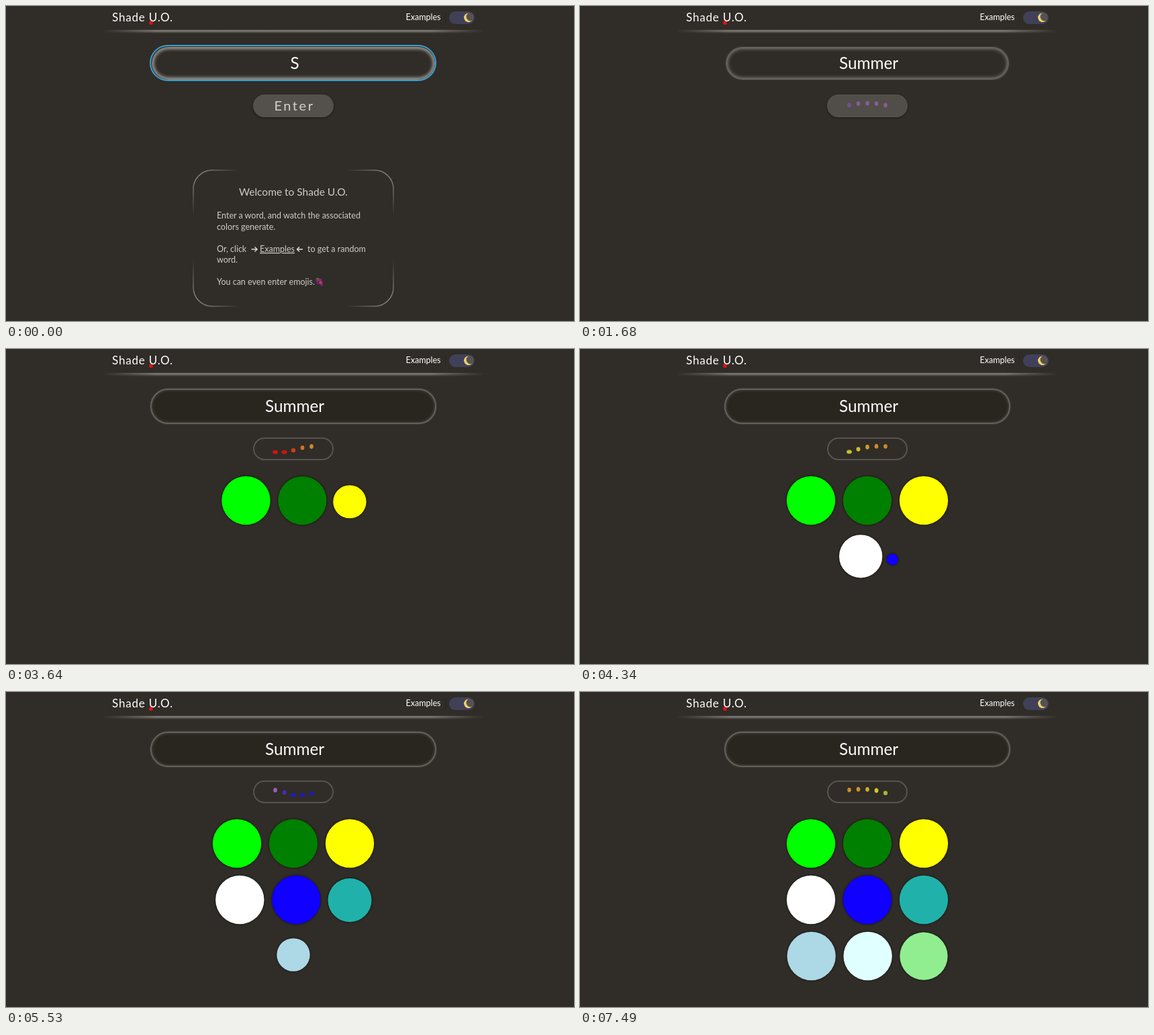
Animation of 846 by 470 pixels, one loop 7.56 s. Source, as an HTML page:

```html
<!DOCTYPE html>
<html lang="en">
<head>
<meta charset="utf-8">
<title>Color words</title>
<style>
html, body { margin: 0; width: 100%; height: 100%; overflow: hidden; background: #302c27; }
body { position: relative; }
div, svg { position: absolute; box-sizing: border-box; }
svg { left: 0; top: 0; }
text { font-family: Lato, "Open Sans", sans-serif; fill: #fff; }
.mid { text-anchor: middle; }
.soft { fill: #cfccc7; font-size: 12.5px; }
.rule { left: 143px; top: 35px; width: 570px; height: 6px;
  background: linear-gradient(#0000, #89857f 30%, #69655f 50%, #0000);
  -webkit-mask: linear-gradient(90deg, #0000, #000 14%, #000 86%, #0000);
  mask: linear-gradient(90deg, #0000, #000 14%, #000 86%, #0000); }
.toggle { left: 660px; top: 8px; width: 38px; height: 19px; border-radius: 10px; background: #404158; }
.field { border-radius: 27px; }
#ring { left: 214px; top: 58px; width: 427px; height: 54px; border: 2px solid #35a0d2; }
#idle { left: 217px; top: 61px; width: 422px; height: 49px; border: 1px solid #85817b;
  box-shadow: inset 0 0 5px 2px #aaa69f; }
#busy { left: 215px; top: 59px; width: 426px; height: 53px; border: 2px solid #64605a; background: #29251f;
  box-shadow: inset 0 0 4px #56524c, 0 0 3px #4b4741; }
#fill, #edge { left: 368px; top: 132px; width: 120px; height: 34px; border-radius: 17px; }
#fill { background: #54514c; box-shadow: 0 1px 3px #1c1916; }
#edge { border: 2px solid #57534e; }
#balls circle { filter: drop-shadow(0 0 1.5px #0d0b08); }
</style>
</head>
<body>
<div class="rule"></div>
<div class="toggle"></div>
<div id="busy" class="field"></div>
<div id="idle" class="field"></div>
<div id="ring" class="field"></div>
<div id="fill"></div>
<div id="edge"></div>
<svg width="846" height="470" viewBox="0 0 846 470">
  <defs>
    <radialGradient id="fade" gradientUnits="userSpaceOnUse" cx="284" cy="250" r="64">
      <stop offset="0" stop-color="#8a867f"/>
      <stop offset=".35" stop-color="#726e68"/>
      <stop offset="1" stop-color="#726e68" stop-opacity="0"/>
    </radialGradient>
    <path id="corner" d="M279 314V273A28 28 0 0 1 307 245H348" fill="none" stroke="url(#fade)" stroke-width="1.5"/>
    <path id="arrow" d="M0 0H8.5M5 -3.5L8.5 0L5 3.5" fill="none" stroke="#e2dfda" stroke-width="1.4"/>
    <clipPath id="disc"><circle cx="689" cy="17.300" r="7"/></clipPath>
  </defs>

  <circle cx="216" cy="25" r="3" fill="#d8141c"/>
  <text x="158" y="23" font-size="17" letter-spacing=".8">Shade U.O.</text>
  <text x="595.500" y="21" font-size="12.500">Examples</text>
  <path d="M654.500 9V25" stroke="#28241f"/>
  <g clip-path="url(#disc)">
    <circle cx="689" cy="17.300" r="7" fill="#f2cf70"/>
    <circle cx="692" cy="16" r="6.500" fill="#55524f"/>
  </g>

  <text id="word" class="mid" x="430" y="93.500" font-size="24.300"></text>
  <text id="enter" class="mid" x="429.500" y="156" font-size="20" letter-spacing="2.600" style="fill:#d3d0cb">Enter</text>

  <g id="welcome">
    <use href="#corner"/>
    <use href="#corner" transform="matrix(-1 0 0 1 856 0)"/>
    <use href="#corner" transform="matrix(1 0 0 -1 0 693)"/>
    <use href="#corner" transform="matrix(-1 0 0 -1 856 693)"/>
    <text class="soft mid" x="428" y="283" style="font-size:15.500px">Welcome to Shade U.O.</text>
    <text class="soft" x="314" y="317">Enter a word, and watch the associated</text>
    <text class="soft" x="314" y="333.500">colors generate.</text>
    <text class="soft" x="314" y="367">Or, click</text>
    <use href="#arrow" x="365.500" y="363"/>
    <text class="soft" x="378" y="367" text-decoration="underline">Examples</text>
    <use href="#arrow" transform="translate(442 363) scale(-1 1)"/>
    <text class="soft" x="449" y="367">to get a random</text>
    <text class="soft" x="314" y="383">word.</text>
    <text class="soft" x="314" y="416">You can even enter emojis.</text>
    <g fill="#8d2a70">
      <circle cx="464" cy="409.500" r="2.500"/><circle cx="468" cy="409" r="2.500"/>
      <circle cx="465" cy="413" r="2.500" fill="#6f2060"/><circle cx="469" cy="413" r="2.500" fill="#a03a84"/>
      <circle cx="470.500" cy="416" r="2" fill="#7b2465"/>
    </g>
    <path d="M461 407Q464 404 467 407Q464 409 461 407" fill="#4c7a35"/>
  </g>

  <g id="dots"></g>
  <g id="balls"></g>
</svg>
<script>
const LOOP = 7560, STEP = 70, SUBMIT = 1330, LOADING = 1540;
const $ = id => document.getElementById(id);
const clamp = v => Math.max(0, Math.min(1, v));

function add(parent, tag) {
  const el = document.createElementNS('http://www.w3.org/2000/svg', tag);
  return $(parent).appendChild(el);
}
function set(el, attrs) {
  for (const key in attrs) el.setAttribute(key, attrs[key]);
}

// fill and the moment each ball starts to grow
const balls = [
  ['#00ff00', 2165], ['#008000', 2700], ['#ffff00', 3240],
  ['#ffffff', 3735], ['#1000ff', 4167], ['#20b2aa', 4910],
  ['#add8e6', 5130], ['#e0ffff', 5900], ['#90ee90', 6650]
].map(([fill, start]) => {
  const el = add('balls', 'circle');
  set(el, { fill });
  return { el, start };
});
const dots = Array.from({ length: 5 }, () => add('dots', 'ellipse'));

// cubic-bezier(.25, .1, .25, 1)
function ease(x) {
  if (x <= 0 || x >= 1) return clamp(x);
  const curve = (a, b, u) => 3 * a * u * (1 - u) ** 2 + 3 * b * u * u * (1 - u) + u ** 3;
  let lo = 0, hi = 1;
  for (let i = 0; i < 20; i++) {
    const u = (lo + hi) / 2;
    if (curve(.25, .25, u) < x) lo = u; else hi = u;
  }
  return curve(.1, 1, lo);
}

// colour stops by time from the red end of the back-and-forth sweep
const stops = [
  [0, 215, 22, 18], [80, 215, 22, 18], [280, 216, 140, 42], [480, 216, 145, 42],
  [700, 220, 212, 45], [1080, 40, 140, 50], [1420, 28, 24, 190],
  [1800, 34, 26, 195], [1950, 172, 100, 196], [2150, 172, 100, 196]
];
function hue(t) {
  const phase = (((t - 3590) % 4300) + 4300) % 4300;
  const d = Math.min(phase, 4300 - phase);
  const i = Math.max(1, stops.findIndex(s => s[0] >= d));
  const a = stops[i - 1], b = stops[i];
  const k = (d - a[0]) / (b[0] - a[0]);
  return `rgb(${[1, 2, 3].map(c => Math.round(a[c] + (b[c] - a[c]) * k))})`;
}

function drawDots(t) {
  $('dots').style.opacity = .95 * clamp((t - LOADING + 70) / 330);
  dots.forEach((el, i) => {
    const own = t - i * 100;
    const wave = (1 - Math.cos((own - 1480) / 420 * Math.PI)) / 2;
    const drop = Math.min(1, 1.1 * wave ** 1.6);
    const squash = drop ** 3;
    set(el, {
      cx: 401 + 13.5 * i, cy: 145.2 + 8.6 * drop,
      rx: 2.8 + 1.2 * squash, ry: 3.4 - .6 * squash, fill: hue(own)
    });
  });
}

// rows of three stay centred while their members grow
function drawBalls(t) {
  for (let row = 0; row < 3; row++) {
    const group = balls.slice(row * 3, row * 3 + 3);
    const sizes = group.map(b => ease((t - b.start) / 1000));
    let x = 428 - 42 * sizes.reduce((a, b) => a + b);
    group.forEach(({ el }, i) => {
      const s = sizes[i];
      const lift = 6 * (1 - sizes[0]);
      const sag = i ? 6 * (1 - s) : 0;
      set(el, { cx: x + 42 * s, cy: 226 + 84 * row - lift + sag, r: 36.2 * s });
      el.style.display = s ? '' : 'none';
      x += 84 * s;
    });
  }
}

function draw(now) {
  const t = Math.floor(now % LOOP / STEP) * STEP;
  const before = t < SUBMIT;
  const k = clamp((t - LOADING) / 560);
  $('word').textContent = 'Summer'.slice(0, 1 + Math.floor(t / 140));
  for (const id of ['ring', 'enter', 'welcome']) $(id).style.display = before ? '' : 'none';
  $('idle').style.opacity = before ? 1 : .85 * (1 - k);
  $('busy').style.opacity = k * k;
  $('fill').style.opacity = 1 - k * k;
  $('edge').style.opacity = k;
  drawDots(t);
  drawBalls(t);
}

const begin = performance.now();
function tick() {
  draw(performance.now() - begin);
  requestAnimationFrame(tick);
}
tick();
</script>
</body>
</html>
```
